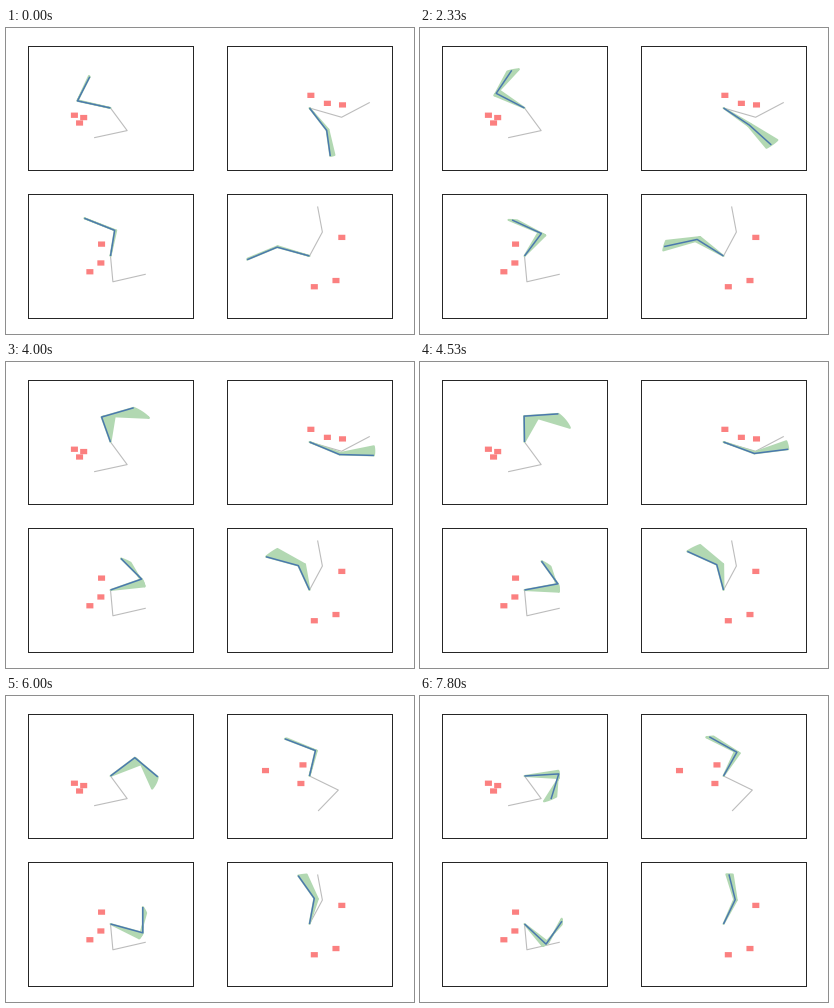
A matplotlib script that plays this animation: 408 by 306 pixels, repeating every 8 s.

```python
import matplotlib.pyplot as plt
import numpy as np
from matplotlib.animation import FuncAnimation
from matplotlib.patches import Polygon, Rectangle

W, H = 408, 306
REACH = 2.4          # half-width of each view, in link lengths
BOX = 0.205          # obstacle side
TICK = 20            # ms per drawn frame
LOOP = 8000
GAP = 12             # steps between key poses
PLAN = 3             # steps between two plans
RESTART = 36         # step at which the second view gets a new task
GREEN = "#b2d8b2"

fig = plt.figure(figsize=(W / 72, H / 72), dpi=72, facecolor="white")


def arm(angles):
    """Base, elbow and tip for absolute link angles in degrees."""
    a = np.radians(angles)
    links = np.column_stack([np.cos(a), np.sin(a)])
    return np.vstack([[0, 0], np.cumsum(links, axis=0)])


class Task:
    """A smooth path from rest through key poses, a goal and obstacles."""

    def __init__(self, poses, goal, boxes):
        self.poses = np.array(poses, float)
        self.slopes = np.gradient(self.poses, axis=0)
        self.slopes[0] = 0
        self.goal = arm(goal)
        self.boxes = boxes

    def angles(self, k):
        i = min(int(k // GAP), len(self.poses) - 2)
        u = min(k / GAP - i, 1)
        (p, q), (m, n) = self.poses[i:i + 2], self.slopes[i:i + 2]
        ease = u * u * (3 - 2 * u)
        return p + (q - p) * ease + u * (1 - u) * ((1 - u) * m - u * n)

    def sweep(self, k):
        """Poses of one plan: steady motion, then braking to rest."""
        start = k // PLAN * PLAN
        end = self.angles(start + PLAN)
        speed = (end - self.angles(start + PLAN - 0.2)) / 0.2
        s = np.linspace(0, PLAN, 9)
        move = [self.angles(start + x) for x in s]
        brake = [end + speed * (x - x * x / (2 * PLAN)) for x in s]
        return np.array([arm(q) for q in move + brake])


class View:
    def __init__(self, left, top):
        self.ax = ax = fig.add_axes([left / W, 1 - (top + 124) / H,
                                     165 / W, 124 / H])
        ax.set(xlim=(-REACH, REACH), ylim=(-REACH, REACH), xticks=[], yticks=[])
        for spine in ax.spines.values():
            spine.set(color="#262626", linewidth=1)
        self.goal = self.line("#bcbcbc", 1.1, 1)
        self.fans = [self.patch(Polygon(np.zeros((3, 2)), fc=GREEN, ec=GREEN,
                                        lw=2, joinstyle="round", zorder=2))
                     for _ in range(2)]
        self.body = self.line("#4a78ae", 1.5, 3)
        self.boxes = [self.patch(Rectangle((0, 0), BOX, BOX, fc="#fb8080",
                                           ec="none", zorder=4))
                      for _ in range(3)]

    def line(self, color, width, z):
        return self.ax.plot([], [], color=color, lw=width, zorder=z,
                            solid_capstyle="butt", solid_joinstyle="round")[0]

    def patch(self, shape):
        shape.set_snap(False)
        return self.ax.add_patch(shape)

    def show(self, task, k):
        self.goal.set_data(*task.goal.T)
        for box, (x, y) in zip(self.boxes, task.boxes):
            box.set_xy((x - BOX / 2, y - BOX / 2))
        poses = task.sweep(k)
        for j, fan in enumerate(self.fans):
            fan.set_xy(np.vstack([poses[:, j], poses[::-1, j + 1]]))
        self.body.set_data(*arm(task.angles(k)).T)


turn_over = Task([(164, 69), (151, 68), (105, 21), (45, -48), (1, -108)],
                 (-61, -164),
                 [(-1.05, -0.28), (-0.78, -0.37), (-0.9, -0.58)])
swing_up = Task([(-60, -84), (-44, -58), (-29, -2), (-21, 35), (-21, 35)],
                (-21, 35),
                [(0.04, 0.49), (0.52, 0.18), (0.96, 0.12)])
second_try = Task([(80, 153), (65, 142), (30, 116)],
                  (-33, -126),
                  [(-1.28, 0.21), (-0.19, 0.43), (-0.25, -0.29)])
fold_down = Task([(83, 152), (66, 151), (25, 127), (-20, 90), (-54, 60)],
                 (-86, 17),
                 [(-0.26, 0.46), (-0.28, -0.27), (-0.6, -0.61)])
rise = Task([(160, 209), (145, 201), (109, 160), (82, 118), (69, 99)],
            (68, 98),
            [(0.94, 0.72), (0.14, -1.19), (0.77, -0.95)])

views = [View(x, y) for y in (18, 166) for x in (22, 221)]


def draw(n):
    # about six steps a second, shown on a grid of 1/15 s
    grid = (n * TICK + 15) * 15 // 1000
    k = grid * 47 // 117
    second = (swing_up, k) if k < RESTART else (second_try, k - RESTART)
    scenes = [(turn_over, k), second, (fold_down, k), (rise, k)]
    for view, scene in zip(views, scenes):
        view.show(*scene)
    return []


anim = FuncAnimation(fig, draw, frames=LOOP // TICK, interval=TICK,
                     repeat=True, repeat_delay=0, blit=False)
plt.show()
```
